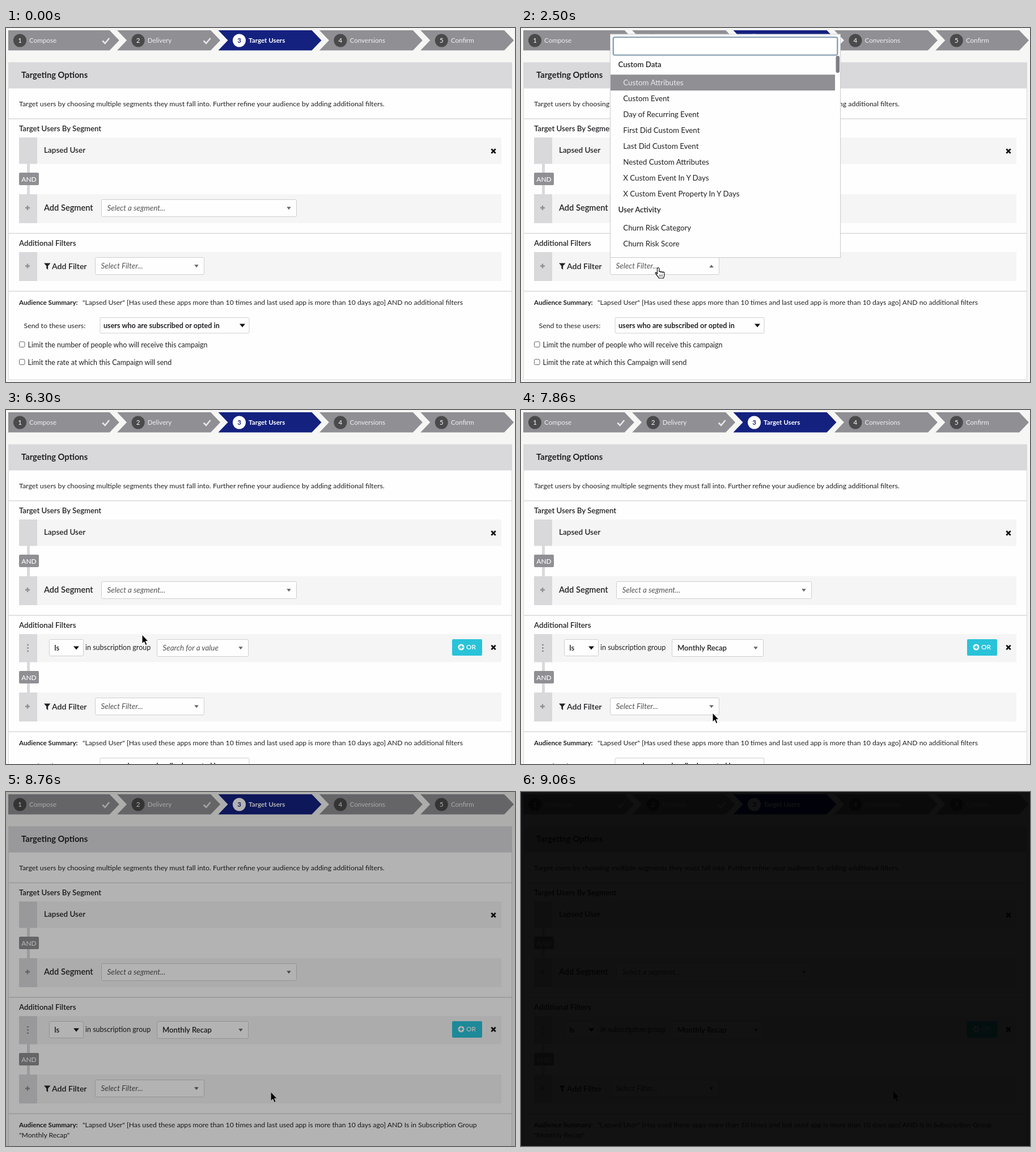
An HTML page for the animation above (9630 ms loop, 898 px wide and 624 px high).

```html
<!DOCTYPE html>
<html lang="en">
<head>
<meta charset="utf-8">
<title>Targeting options</title>
<style>
html, body { margin: 0; width: 100%; height: 100%; overflow: hidden; background: #f6f6f5; }
svg { display: block; font-family: Lato, "Open Sans", sans-serif; }
#stage { width: 100%; height: 100%; }
</style>
</head>
<body>
<svg id="stage" viewBox="0 0 898 624"></svg>
<script>
const LOOP = 9630;
const INK = '#222225', GREY = '#8f8f94', PALE = '#d9d9dc', EDGE = '#cfcfd3', NAVY = '#14217f';

// Moments of the story, in ms
const OPEN = 1960, TYPE = 3230, MOVE = 4930, PICK = 5900;
const OPEN2 = 6830, LOADED = 7000, PICK2 = 7860, SUMMED = 8030;
const KEYS = [TYPE, 3330, 3450, 3560, 3660, 3860, 3960, 4060];

const GROUPS = {
  'Custom Data': ['Custom Attributes', 'Custom Event', 'Day of Recurring Event',
    'First Did Custom Event', 'Last Did Custom Event', 'Nested Custom Attributes',
    'X Custom Event In Y Days', 'X Custom Event Property In Y Days'],
  'User Activity': ['Churn Risk Category', 'Churn Risk Score', 'Subscore Category'],
  'User Attributes': ['Email Subscription Status', 'Push Subscription Status', 'Subscription Group']
};
const LISTS = ['Daily Digest', 'Early Access', 'Monthly Recap', 'Newsletter', 'Special Offers', 'Weekly Tips'];

const PATH = [[200, 300, 640], [760, 234, 331], [1030, 234, 331], [1130, 238, 337], [1300, 238, 337],
  [1700, 242, 423], [MOVE, 242, 423], [5860, 240, 396], [6300, 240, 396], [6560, 338, 424],
  [LOADED, 338, 424], [7500, 338, 534], [8300, 338, 534], [8500, 352, 533],
  [8700, 430.5, 530.5], [8860, 526.5, 525.5], [9060, 656.5, 527]];
const FADE = [[8645, 0], [8700, .14], [8860, .55], [9060, .93]];

function track(keys, t, ease = k => k) {
  const i = keys.findIndex(k => k[0] > t);
  if (i < 0) return keys.at(-1).slice(1);
  if (i === 0) return keys[0].slice(1);
  const a = keys[i - 1], b = keys[i], k = ease((t - a[0]) / (b[0] - a[0]));
  return a.slice(1).map((v, j) => v + (b[j + 1] - v) * k);
}
const smooth = k => k * k * (3 - 2 * k);

const rect = (x, y, w, h, fill, more = '') =>
  `<rect x="${x}" y="${y}" width="${w}" height="${h}" fill="${fill}" ${more}/>`;
const path = (d, fill, more = '') => `<path d="${d}" fill="${fill}" ${more}/>`;
const line = (d, color, width) => path(d, 'none', `stroke="${color}" stroke-width="${width}"`);
const text = (x, y, s, size, fill = INK, more = '') =>
  `<text x="${x}" y="${y}" font-size="${size}" fill="${fill}" ${more}>${s}</text>`;
const semi = (x, y, s, size, fill) => text(x, y, s, size, fill, 'font-weight="600"');
const bold = (x, y, s, size, fill) => text(x, y, s, size, fill, 'font-weight="700"');
const box = (x, y, w, h) => rect(x, y, w, h, '#fefefe', `stroke="${EDGE}" rx="2"`);
const rule = y => line(`M5 ${y}H892`, '#d8d8da', 1.3);
const shift = (dy, s) => `<g transform="translate(0 ${dy})">${s}</g>`;

function arrow(x, y, w, h, color, up) {
  const s = up ? -1 : 1;
  return path(`M${x - w / 2} ${y - s * h / 2}h${w}l${-w / 2} ${s * h}z`, color);
}
const select = (x, y, w, label, chosen, up) => box(x, y, w, 30) +
  (chosen ? semi(x + 9.5, y + 19.7, label, 13.1)
          : text(x + 10, y + 19.3, label, 13.4, '#555558', 'font-style="italic"')) +
  arrow(x + w - 13.5, y + 15.3, 7.5, 5, '#68686c', up);

const cross = y => line(`M856.300 ${y - 3.7}l7.400 7.400m0-7.400l-7.400 7.400`, '#111', 2.7);
const plus = (x, y, r, color, w) => line(`M${x - r} ${y}h${2 * r}M${x} ${y - r}v${2 * r}`, color, w);
const row = (y, h) => rect(23, y, 851, h, '#f5f5f5') + rect(23, y, 32, h, PALE);
const and = y => rect(37, y - 27, 5, 54, PALE) + rect(23, y - 11, 35, 22, GREY, 'rx="2"') +
  text(40.5, y + 4.5, 'AND', 12, '#fff', 'text-anchor="middle" font-weight="500"');

function tab(name, i) {
  const x = 17.7 + 178.4 * i, on = i === 2, c = i ? x + 37 : 24.5;
  const left = i ? x : 4, end = i < 4 ? x + 165 : 879, notch = i ? 'l17 -17.800z' : 'z';
  return path(`M${left} 4H${end}l17 17.800l-17 17.800H${left}${notch}`, on ? NAVY : GREY) +
    `<circle cx="${c}" cy="22" r="11.500" fill="${on ? '#fff' : '#4a4a4c'}"/>` +
    text(c, 26, i + 1, 11.5, on ? NAVY : '#fff', `text-anchor="middle" font-weight="${on ? 700 : 400}"`) +
    (on ? bold : text)(c + 16.6, 25.7, name, 11.6, on ? '#fff' : '#f0f0f1') +
    (i < 2 ? line(`M${x + 152.5} 22.500l4.500 4.500l7.500 -9`, '#e6e6e8', 2.6) : '');
}

const base = ['Compose', 'Delivery', 'Target Users', 'Conversions', 'Confirm'].map(tab).join('') +
  rect(4.5, 61, 888, 45.5, PALE) + bold(27, 88, 'Targeting Options', 14.7) +
  text(23, 137.5, 'Target users by choosing multiple segments they must fall into. ' +
    'Further refine your audience by adding additional filters.', 12.38) +
  rule(160) + semi(23, 181.5, 'Target Users By Segment', 13.2) +
  row(193, 46.5) + semi(67, 220, 'Lapsed User', 13.5) + cross(217) +
  row(293, 51) + and(266) + plus(38, 317, 4, GREY, 2.4) +
  semi(67, 322, 'Add Segment', 14.6) + select(168.5, 302.5, 344, 'Select a segment...') +
  rule(362) + semi(23, 383.5, 'Additional Filters', 13.3);

const checkbox = (y, label) => rect(23.5, y - 5, 9.5, 9.5, '#fff', 'stroke="#66666a" rx="2"') +
  text(38.5, y + 4.5, label, 12.47);

const sending = text(31.5, 528.5, 'Send to these users:', 12.3) + box(166, 510.5, 263, 27.5) +
  bold(172, 528.5, 'users who are subscribed or opted in', 12.6) + arrow(417, 524.5, 10, 6, '#111') +
  checkbox(558, 'Limit the number of people who will receive this campaign') +
  checkbox(589, 'Limit the rate at which this Campaign will send');

const filterRow = open => row(395, 51) + plus(38, 419.5, 4, GREY, 2.4) +
  path('M67 414.500h11.500l-4.400 5v6.500l-2.800-2.200v-4.300z', INK) +
  semi(81, 425.3, 'Add Filter', 14.1) + select(157.5, 404.5, 192, 'Select Filter...', false, open);

const summary = done => rule(464) + bold(23, 488, 'Audience Summary:', 11.7) +
  text(135, 488, '"Lapsed User" [Has used these apps more than 10 times and last used app is more than 10 days ago] AND ' +
    (done ? 'Is in Subscription Group' : 'no additional filters'), 12.22) +
  (done ? text(23, 505.5, '"Monthly Recap"', 12.22) : '');

const condition = (chosen, open) => row(395, 49.5) +
  [414, 419.5, 425].map(y => `<circle cx="38.500" cy="${y}" r="1.300" fill="#77777b"/>`).join('') +
  box(76.5, 404.5, 60, 29) + semi(85, 424, 'Is', 13.2) + arrow(124, 419.5, 10, 6, '#111') +
  text(140, 422.5, 'in subscription group', 12.5) +
  select(266.5, 404.5, 161, chosen ? 'Monthly Recap' : 'Search for a value', chosen, open) +
  rect(787, 404, 53, 29, '#29c3d9', 'rx="2"') +
  '<circle cx="803" cy="418" r="5.500" fill="#fff"/>' + plus(803, 418, 3.2, '#29c3d9', 2) +
  semi(812, 422.3, 'OR', 11.8, '#fff') + cross(418.5);

// A drop-down with a search box; rows are [label, isHeader]
function menu({ x, w, y, up, rows, query, caret, indent, mouse }) {
  let at = rows[0][1] ? 58 : 59;
  const spots = rows.map(([label, head], i) => {
    if (i) at += rows[i - 1][1] ? 31.7 : head ? 27.5 : 28.1;
    return { label, head, at };
  });
  const full = at + 10.5, h = Math.min(full, 393.5), long = full > h;
  const top = up ? y - h : y;
  const items = spots.filter(s => !s.head);
  const under = s => mouse && mouse[1] > top + s.at - 18.5 && mouse[1] < top + s.at + 9.6;
  const lit = items.find(under) || items[0];
  const list = spots.map(s => s.head ? semi(13.5, s.at, s.label, 13.2) :
    (s === lit ? rect(0, s.at - 18.5, long ? w - 10 : w, 28, GREY) : '') +
    text(indent, s.at, s.label, 13.3, s === lit ? '#ececee' : INK)).join('');
  const cx = 9.5 + [...query].reduce((n, c) => n + ({ r: .333, i: .222, s: .5, c: .5 }[c] || .556) * 11, 0);
  return rect(x - 1, top, w + 2, h + 1, '#000', 'opacity=".06"') +
    rect(x, top, w, h, '#fefefe', `stroke="${EDGE}"`) +
    `<svg x="${x + .5}" y="${top}" width="${w - 1}" height="${h - 1.5}">${list}</svg>` +
    rect(x + 5.5, top + 5.5, w - 11, 31, 'none', 'stroke="#c9d8e2" stroke-width="4" rx="3"') +
    rect(x + 5.5, top + 5.5, w - 11, 31, '#fff', 'stroke="#7790a3" stroke-width="1.600" rx="2"') +
    text(x + 9.5, top + 25.2, query, 11, '#444', 'font-family="Liberation Sans, Arial, sans-serif"') +
    (caret ? rect(x + cx + .5, top + 14, 1, 14, '#222') : '') +
    (long ? rect(x + w - 8, top + 38, 6.5, 30, '#7f7f84', 'rx="3"') : '');
}

const ARROW = path('M0 0V16l3.700-3.500 2.500 6 2.700-1.100-2.500-5.800H11z', '#000', 'stroke="#fff"');
const HAND = path('M-1.600 11V1.200a1.700 1.700 0 0 1 3.400 0V7a1.700 1.700 0 0 1 3.200.4 1.600 1.600 0 0 1 3 .5 ' +
  '1.500 1.500 0 0 1 2.800 1V13q0 2-1.400 4.500V18H1.200V17.500Q-.5 15-2.600 12.500T-5 8.900Q-4.500 7-2.900 8.500z',
  '#fff', 'stroke="#111" stroke-width="1.200"') + line('M2.300 11.500v4M4.800 11.500v4M7.300 11.500v4', '#111', .8);

const blink = since => since % 1000 < 500;

function filterMenu(t, mouse) {
  const query = 'subscrip'.slice(0, KEYS.filter(k => k <= t).length);
  const rows = Object.entries(GROUPS).flatMap(([name, labels]) => {
    const hits = labels.filter(l => l.toLowerCase().includes(query));
    return hits.length ? [[name, true], ...hits.map(l => [l, false])] : [];
  });
  return menu({ x: 157.5, w: rows.length > 10 ? 406 : 192, y: 404.5, up: true, rows, query,
    caret: blink(t - (query ? 3960 : OPEN)), indent: 22.3, mouse });
}

function groupMenu(t, mouse) {
  const rows = (t < LOADED ? ['Searching...'] : LISTS).map(l => [l, false]);
  return menu({ x: 266.5, w: 161, y: 434.5, up: false, rows, query: '',
    caret: blink(t - OPEN2), indent: 9.5, mouse });
}

function scene(t) {
  const within = (a, b) => t >= a && t < b;
  const added = t >= PICK, chosen = t >= PICK2, done = t >= SUMMED;
  const open = within(OPEN, PICK), open2 = within(OPEN2, PICK2);
  const shown = t >= 200 && !within(TYPE, MOVE);
  const mouse = track(PATH, t, t < 8000 ? smooth : undefined);
  const pointing = within(1600, PICK) || within(6480, PICK2);
  const down = added ? 103 : 0;
  const [dark] = track(FADE, t);

  return rect(0, 0, 898, 624, '#f6f6f5') +
    rect(4.5, 61, 888, added ? 700 : 559, '#fefefe', 'stroke="#d8d8da"') + base +
    (added ? condition(chosen, open2) : '') +
    shift(down, filterRow(open) + summary(done)) +
    (added ? and(471) : '') +
    shift(down + (done ? 17.5 : 0), sending) +
    (open ? filterMenu(t, shown && mouse) : '') +
    (open2 ? groupMenu(t, mouse) : '') +
    (shown ? `<g transform="translate(${mouse})">${pointing ? HAND : ARROW}</g>` : '') +
    (dark ? rect(0, 0, 898, 624, '#000', `opacity="${dark}"`) : '');
}

const stage = document.getElementById('stage');
const start = performance.now();
let last = '';
function draw() {
  const next = scene((performance.now() - start) % LOOP);
  if (next !== last) stage.innerHTML = last = next;
  requestAnimationFrame(draw);
}
draw();
</script>
</body>
</html>
```
